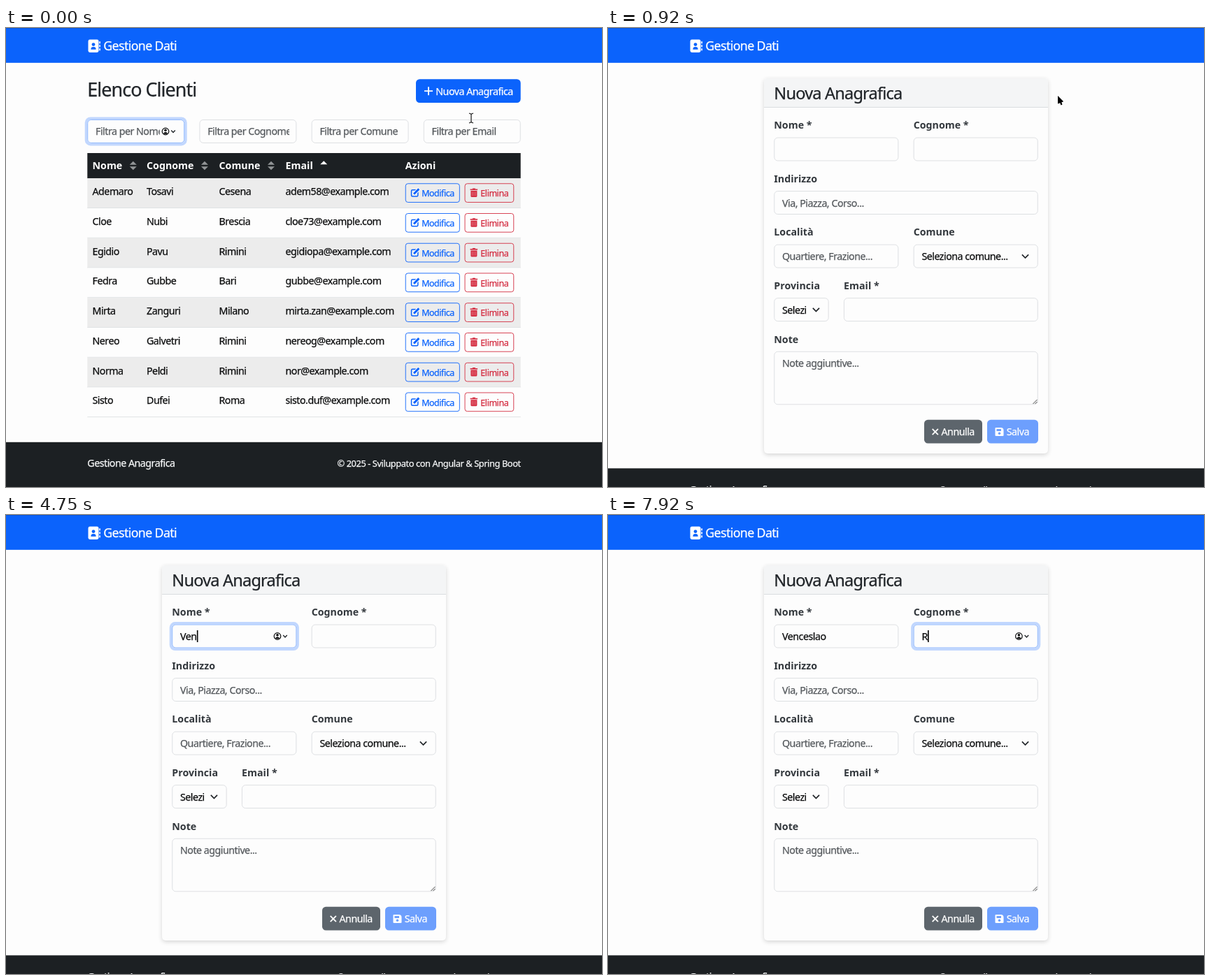
Write an HTML page with a canvas that moves like this. It is 852 px wide and 657 px high and loops after 8000 ms.

```html
<!DOCTYPE html>
<html lang="it">
<head>
<meta charset="utf-8">
<title>Gestione Dati</title>
<style>
html, body { margin: 0; width: 100%; height: 100%; overflow: hidden; background: #fdfdfd; }
canvas { display: block; }
</style>
</head>
<body>
<canvas id="stage" width="852" height="657"></canvas>
<script>
const ctx = document.getElementById('stage').getContext('2d');
const LOOP = 8000;

// Page lengths are CSS pixels times the zoom of the page.
const ZOOM = 0.89;
const BODY = 16 * ZOOM, SMALL = 14 * ZOOM, GUTTER = 24 * ZOOM, CONTROL = 38 * ZOOM;
const LEFT = 116.3, WIDTH = 852 - 2 * LEFT, RIGHT = LEFT + WIDTH;
const TABLE_TOP = 179, HEAD = 36.2, ROW = 42.75;
const FORM_LEFT = 237.3, FORM_WIDTH = 852 - 2 * FORM_LEFT, FORM_STEP = 76.55;

const PAGE = '#fdfdfd', BLUE = '#0b63fc', PALE_BLUE = '#6d9ffd', DARK = '#1c2023';
const INK = '#212529', BLACK = '#0c0d0e', RED = '#d42c40', HINT = '#55595d', LINE = '#dadde0';

const HEADERS = ['Nome', 'Cognome', 'Comune', 'Email'];
const COLUMNS = [123.5, 201, 304.5, 399.5];
const CLIENTS = [
  ['Ademaro', 'Tosavi', 'Cesena', 'adem58@example.com'],
  ['Cloe', 'Nubi', 'Brescia', 'cloe73@example.com'],
  ['Egidio', 'Pavu', 'Rimini', 'egidiopa@example.com'],
  ['Fedra', 'Gubbe', 'Bari', 'gubbe@example.com'],
  ['Mirta', 'Zanguri', 'Milano', 'mirta.zan@example.com'],
  ['Nereo', 'Galvetri', 'Rimini', 'nereog@example.com'],
  ['Norma', 'Peldi', 'Rimini', 'nor@example.com'],
  ['Sisto', 'Dufei', 'Roma', 'sisto.duf@example.com']
];

// Each row holds [label, columns out of 12, hint].
const FORM = [
  [['Nome *', 6], ['Cognome *', 6]],
  [['Indirizzo', 12, 'Via, Piazza, Corso...']],
  [['Località', 6, 'Quartiere, Frazione...'], ['Comune', 6, 'Seleziona comune...']],
  [['Provincia', 3, 'Seleziona'], ['Email *', 9]],
  [['Note', 12, 'Note aggiuntive...']]
];
const SELECTS = ['Comune', 'Provincia'];

const FIRST_NAME = 'Venceslao', LAST_NAME = 'R';
const PRESS = 750, OPEN_FORM = 910, FOCUS_FIRST = 2120, FOCUS_LAST = 7130;
const FIRST_KEY = 4170, KEY_GAP = 250, LAST_KEY = 7830, POINTER_BACK = 6650;

const clamp = v => Math.max(0, Math.min(1, v));
const ramp = (t, from, length) => clamp((t - from) / length);
const mix = (a, b, f) => a + (b - a) * f;
const smooth = v => v * v * (3 - 2 * v);

function at(x, y, draw) {
  ctx.save();
  ctx.translate(x, y);
  draw();
  ctx.restore();
}

function faded(alpha, draw) {
  ctx.globalAlpha = alpha;
  draw();
  ctx.globalAlpha = 1;
}

// Text is placed by the middle of its capitals.
function text(str, x, midY, size = BODY, color = INK, bold = false, align = 'left') {
  ctx.font = `${bold ? 'bold ' : ''}${size}px "Noto Sans", sans-serif`;
  ctx.letterSpacing = bold ? '0px' : `${-0.035 * size}px`;
  ctx.textAlign = align;
  ctx.fillStyle = ctx.strokeStyle = color;
  ctx.lineWidth = 0.25;
  ctx.fillText(str, x, midY + 0.357 * size);
  if (!bold) ctx.strokeText(str, x, midY + 0.357 * size);
}

function rect(x, y, w, h, color) {
  ctx.fillStyle = color;
  ctx.fillRect(x, y, w, h);
}

function box(x, y, w, h, r, fill) {
  ctx.beginPath();
  ctx.roundRect(x, y, w, h, r);
  ctx.fillStyle = fill;
  ctx.fill();
}

// The border lies inside the given size.
function frameBox(x, y, w, h, r, color, width = ZOOM) {
  ctx.beginPath();
  ctx.roundRect(x + width / 2, y + width / 2, w - width, h - width, r);
  ctx.strokeStyle = color;
  ctx.lineWidth = width;
  ctx.stroke();
}

function line(points, color, width) {
  ctx.beginPath();
  points.forEach(([x, y]) => ctx.lineTo(x, y));
  ctx.strokeStyle = color;
  ctx.lineWidth = width;
  ctx.stroke();
}

function disc(x, y, r, color) {
  ctx.beginPath();
  ctx.arc(x, y, r, 0, 2 * Math.PI);
  ctx.fillStyle = color;
  ctx.fill();
}

function triangle(x, y, size, color) {
  ctx.beginPath();
  ctx.moveTo(x - Math.abs(size), y);
  ctx.lineTo(x, y - size);
  ctx.lineTo(x + Math.abs(size), y);
  ctx.fillStyle = color;
  ctx.fill();
}

function chevron(x, y, s, width) {
  line([[x - s, y - s / 2], [x, y + s / 2], [x + s, y - s / 2]], INK, width);
}

function plus(x, y, r, angle = 0) {
  at(x, y, () => {
    ctx.rotate(angle);
    line([[-r, 0], [r, 0]], '#fff', 1.8);
    line([[0, -r], [0, r]], '#fff', 1.8);
  });
}

function person(x, y, s, color) {
  disc(x, y - 0.8 * s, s, color);
  box(x - 1.5 * s, y + 0.6 * s, 3 * s, 1.6 * s, [1.4 * s, 1.4 * s, 0, 0], color);
}

function accountIcon(x, y) {
  frameBox(x - 5.4, y - 5.4, 10.8, 10.8, 5, BLACK, 1.2);
  person(x, y - 0.2, 1.8, BLACK);
  chevron(x + 11, y, 2.8, 1.4);
}

function editIcon(x, y) {
  frameBox(x, y + 1.5, 10.8, 10.8, 1.5, BLUE, 1.5);
  line([[x + 3.4, y + 9], [x + 12, y + 0.4]], PAGE, 5);
  line([[x + 4.2, y + 8.2], [x + 11.5, y + 0.9]], BLUE, 3);
}

function trashIcon(x, y) {
  rect(x, y + 1, 10.5, 1.6, RED);
  rect(x + 3.3, y, 4, 1.6, RED);
  box(x + 0.8, y + 3.4, 9, 9.2, [0, 0, 1.5, 1.5], RED);
  for (let i = 0; i < 3; i++) rect(x + 2.8 + 2.2 * i, y + 5, 0.6, 5.8, '#eda5ad');
}

function bookIcon(x, y) {
  box(x, y, 15, 18.5, 2.4, '#fff');
  for (let i = 0; i < 3; i++) box(x + 15.8, y + 2.5 + 5 * i, 1.6, 3.5, 0.8, '#fff');
  person(x + 7.5, y + 9, 2.4, BLUE);
}

function saveIcon(x, y) {
  box(x, y, 12, 12, [1, 4, 1, 1], '#fff');
  rect(x + 2, y + 2, 6.5, 3, PALE_BLUE);
  disc(x + 6, y + 8.3, 1.8, PALE_BLUE);
}

function field(x, y, w, h = CONTROL, focus = 0) {
  const ring = 4 * ZOOM;
  faded(focus, () => box(x - ring, y - ring, w + 2 * ring, h + 2 * ring, 8, '#c1d7fe'));
  box(x, y, w, h, 5.3, PAGE);
  frameBox(x, y, w, h, 5, focus > 0.5 ? '#83b0fd' : LINE);
}

function fieldText(str, x, midY, room, color) {
  ctx.save();
  ctx.beginPath();
  ctx.rect(x, midY - 14, room, 28);
  ctx.clip();
  text(str, x, midY, BODY, color);
  ctx.restore();
}

function navbar() {
  rect(0, 0, 852, 56 * ZOOM, BLUE);
  rect(0, 0, 852, 1, '#0b55d6');
  bookIcon(117.5, 16.5);
  text('Gestione Dati', 139.3, 25.7, 20 * ZOOM, '#fff');
}

function footer(top) {
  rect(0, top, 852, 657 - top, DARK);
  text('Gestione Anagrafica', LEFT, top + 30.5, BODY, '#f8f9fa');
  text('© 2025 - Sviluppato con Angular & Spring Boot', RIGHT, top + 31, 12.9, '#f8f9fa', false, 'right');
}

function actionButton(label, x, y, w, color, icon) {
  frameBox(x, y, w, 31 * ZOOM, 3.4, color);
  icon(x + 8, y + 7.2);
  text(label, x + w - 8, y + 14.5, SMALL, color, false, 'right');
}

function clientRow(client, i) {
  const top = TABLE_TOP + HEAD + i * ROW;
  rect(LEFT, top, WIDTH, ROW, i % 2 ? PAGE : '#ececec');
  rect(LEFT, top + ROW - ZOOM, WIDTH, ZOOM, '#dcdfe1');
  client.forEach((value, c) => text(value, COLUMNS[c], top + 18.8, BODY, BLACK));
  actionButton('Modifica', 570.8, top + 8 * ZOOM, 78, BLUE, editIcon);
  actionButton('Elimina', 655.6, top + 8 * ZOOM, 70.6, RED, trashIcon);
}

function listPage(t) {
  text('Elenco Clienti', LEFT, 88, 26.9);
  const hover = ramp(t, 390, 130);
  box(586, 73.2, RIGHT - 586, CONTROL, 5.3, `rgb(${mix(11, 9, hover)}, ${mix(99, 82, hover)}, ${mix(252, 204, hover)})`);
  plus(604, 90.2, 6);
  text('Nuova Anagrafica', 614.3, 90.5, BODY, '#fff');

  const showIcon = t < PRESS;
  const step = (WIDTH + GUTTER) / 4;
  HEADERS.forEach((name, i) => {
    const x = LEFT + i * step, w = step - GUTTER;
    field(x, 131, w, CONTROL, i ? 0 : 1);
    fieldText('Filtra per ' + name, x + 11.7, 148.3, w - (showIcon && !i ? 47 : 22), HINT);
  });
  if (showIcon) accountIcon(228, 148);

  rect(LEFT, TABLE_TOP, WIDTH, HEAD, DARK);
  HEADERS.concat('Azioni').forEach((name, i) => {
    const x = COLUMNS[i] || 570.7;
    text(name, x, 197, BODY, '#fff', true);
    const arrowX = x + ctx.measureText(name).width + 15.5;
    if (i < 3) {
      triangle(arrowX, 195.7, 5, '#919496');
      triangle(arrowX, 198.3, -5, '#919496');
    }
    if (i === 3) triangle(arrowX, 195.3, 5, '#fff');
  });
  CLIENTS.forEach(clientRow);
  footer(592.8);
}

function blink(t, since) {
  return clamp(0.5 + 0.9 * Math.sin(2 * Math.PI * (t - since - 30) / 976));
}

function typedField(t, x, name, keys, focused, solid, since) {
  const typed = name.slice(0, Math.max(0, keys));
  text(typed, x + 11.7, 174, BODY, BLACK);
  if (!focused) return;
  const end = x + 12 + ctx.measureText(typed).width;
  faded(solid ? 1 : blink(t, since), () => rect(end, 165, 1.6, 17, '#000'));
}

function formPage(t) {
  const cardX = FORM_LEFT - 16 * ZOOM, cardW = 852 - 2 * cardX;
  ctx.save();
  ctx.shadowColor = 'rgba(0,0,0,.16)';
  ctx.shadowBlur = 6;
  ctx.shadowOffsetY = 2;
  box(cardX, 72, cardW, 537, 5, PAGE);
  ctx.restore();
  box(cardX, 72, cardW, 41, [5, 5, 0, 0], '#f4f5f6');
  rect(cardX, 113, cardW, 1, LINE);
  text('Nuova Anagrafica', FORM_LEFT, 93.5, 23.6);

  const last = ramp(t, FOCUS_LAST, 110);
  const first = ramp(t, FOCUS_FIRST, 110) * (1 - last);
  const unit = (FORM_WIDTH + GUTTER) / 12;
  FORM.forEach((cells, row) => {
    let x = FORM_LEFT;
    cells.forEach(([label, span, hint], i) => {
      const w = span * unit - GUTTER, top = 156.6 + row * FORM_STEP;
      const select = SELECTS.includes(label);
      text(label, x, top - 17.3, BODY, '#33383d', true);
      field(x, top, w, label === 'Note' ? 76.5 : CONTROL, row ? 0 : i ? last : first);
      if (hint) fieldText(hint, x + 11.7, top + 17.3, w - (select ? 44 : 22), select ? BLACK : HINT);
      if (select) chevron(x + w - 18.2, top + 17, 4.6, 1.7);
      x += w + GUTTER;
    });
  });
  [6, 3].forEach(s => line([[613.5 - s, 538], [613.5, 538 - s]], '#444', 1));

  box(452, 560.8, 83, CONTROL, 5.3, '#5d656c');
  plus(467.8, 578, 5.8, Math.PI / 4);
  text('Annulla', 476.5, 578, BODY, '#fff');
  box(542, 560.8, 73, CONTROL, 5.3, PALE_BLUE);
  saveIcon(553.5, 572);
  text('Salva', 569.8, 578, BODY, '#fff');

  const inLast = t >= FOCUS_LAST, inFirst = t >= FOCUS_FIRST && !inLast;
  const keys = Math.floor((t - FIRST_KEY) / KEY_GAP) + 1;
  const lastX = FORM_LEFT + 6 * unit;
  typedField(t, FORM_LEFT, FIRST_NAME, keys, inFirst, t >= FIRST_KEY, FOCUS_FIRST);
  typedField(t, lastX, LAST_NAME, t >= LAST_KEY ? 1 : 0, inLast, t >= LAST_KEY, FOCUS_LAST);
  if (inFirst || inLast) accountIcon((inLast ? lastX : FORM_LEFT) + 150.7, 173.5);
  footer(630.3);
}

function beam(x, y) {
  [['#fff', 2.6], ['#111', 1.2]].forEach(([color, width]) => {
    line([[x, y - 6], [x, y + 6]], color, width);
    [-1, 1].forEach(s => line([[x - 3, y + 7 * s], [x, y + 5.8 * s], [x + 3, y + 7 * s]], color, width));
  });
}

function arrow(x, y) {
  const tipX = x - 1, tipY = y - 7;
  [['#fff', 1.8], ['#000', 0]].forEach(([color, edge]) => at(tipX, tipY, () => {
    line([[3.2, 7], [5.5, 13 + edge / 3]], color, 2.2 + edge);
    ctx.beginPath();
    ctx.lineTo(0, 0);
    ctx.lineTo(0, 11.6);
    ctx.lineTo(8.2, 8.2);
    ctx.closePath();
    ctx.fillStyle = ctx.strokeStyle = color;
    ctx.lineWidth = edge;
    if (edge) ctx.stroke();
    ctx.fill();
  }));
}

function hand(x, y) {
  [['#111', 0.9], ['#fff', 0]].forEach(([color, edge]) => at(x, y, () => {
    const part = (px, py, w, h, r) => box(px - edge, py - edge, w + 2 * edge, h + 2 * edge, r + edge, color);
    part(-3.2, -6.4, 2.6, 9, 1.3);
    part(-3.2, -1.6, 9, 7, 2);
    part(-1.2, 3, 6, 4, 1);
    ctx.rotate(-0.75);
    part(-4.6, -2.8, 2.4, 6.5, 1.2);
  }));
  for (let i = 0; i < 3; i++) rect(x + 0.2 + 1.8 * i, y + 1.8, 0.7, 3, '#111');
}

function pointer(t) {
  if ((t >= FIRST_KEY && t < POINTER_BACK) || t >= LAST_KEY) return;
  let x = 665, y = 129;
  const glide = (from, length, toX, toY) => {
    const f = smooth(ramp(t, from, length));
    x = mix(x, toX, f);
    y = mix(y, toY, f);
  };
  glide(60, 520, 644, 104);
  glide(940, 560, 508, 151);
  glide(1720, 510, 313, 182);
  glide(POINTER_BACK - 1, 1, 365, 176);
  glide(6680, 550, 606, 182);

  const overButton = t < OPEN_FORM && y < 113;
  const overField = t < OPEN_FORM ? y > 128 : y > 157 && (x < 416 || x > 437);
  (overButton ? hand : overField ? beam : arrow)(x, y);
}

const start = performance.now();
function frame() {
  const t = (performance.now() - start) % LOOP;
  rect(0, 0, 852, 657, PAGE);
  navbar();
  (t < OPEN_FORM ? listPage : formPage)(t);
  pointer(t);
  requestAnimationFrame(frame);
}
frame();
</script>
</body>
</html>
```
